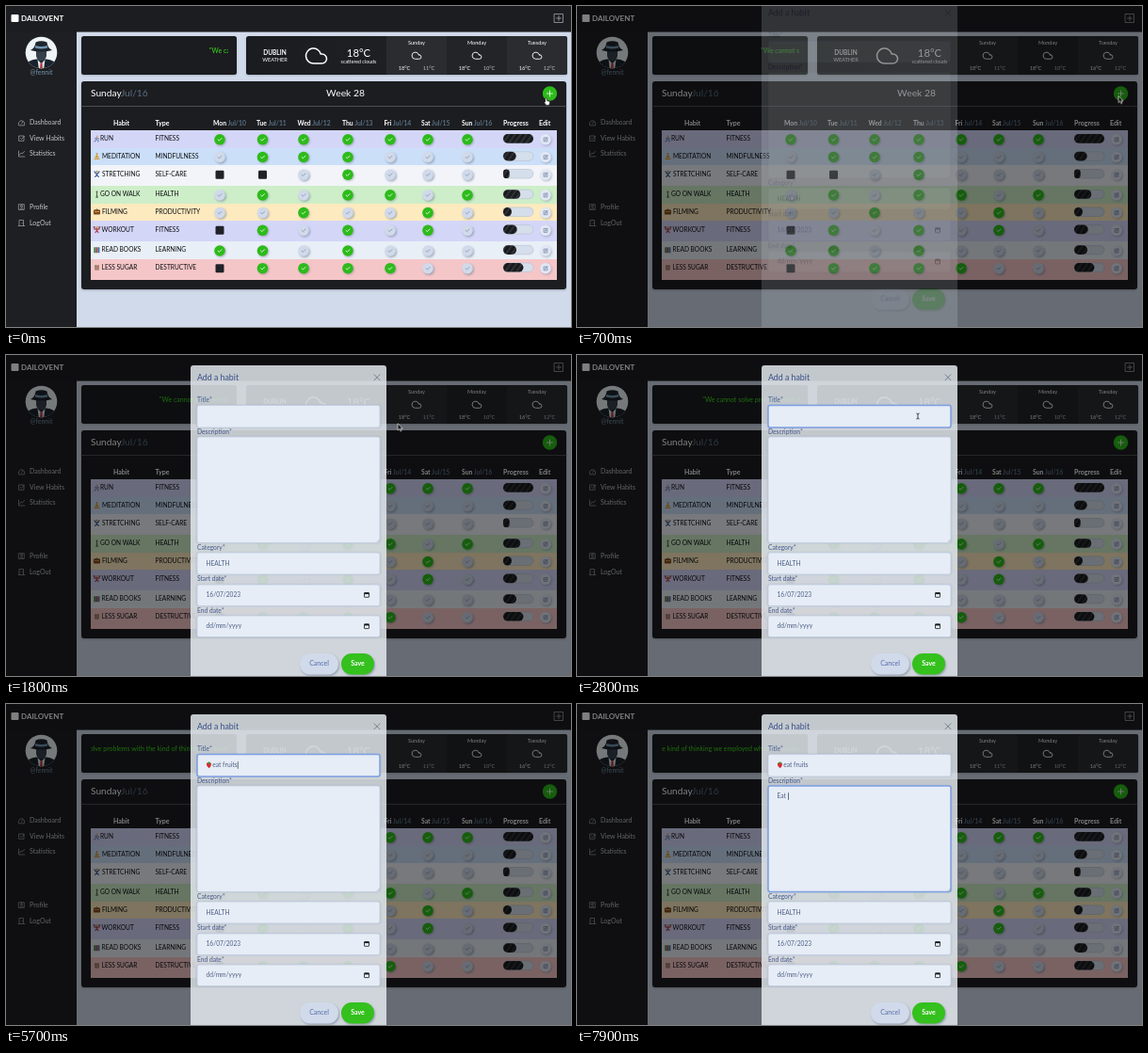
Animation of 600 by 341 pixels, one loop 8000 ms. Source, as an HTML page:

```html
<!DOCTYPE html>
<html lang="en">
<head>
<meta charset="utf-8">
<title>Habit tracker</title>
<style>
  html, body { margin: 0; width: 100%; height: 100%; overflow: hidden; background: #d0daea; }
  svg { display: block; width: 100vw; height: 100vh; }
  text { font: 7px Lato, "Open Sans", sans-serif; white-space: pre; }
  .bold { font-weight: 700; }
  .mid { text-anchor: middle; }
  .line { fill: none; stroke-linecap: round; stroke-linejoin: round; }
  .quote { animation: scroll 8s linear infinite; }
  .shade { animation: shade 8s linear infinite; }
  .modal { animation: fade 8s linear infinite, drop 8s linear infinite; }
  .mouse { animation: mouse 8s linear infinite; }
  .hand { animation: hand 8s step-end infinite; }
  .arrow { animation: arrow 8s step-end infinite; }
  .beam { animation: beam 8s step-end infinite; }
  @keyframes scroll { from { transform: translateX(216px); } to { transform: translateX(-20px); } }
  @keyframes shade { 0%, 6.5% { opacity: 0; } 8.375%, 100% { opacity: .5; } }
  @keyframes fade { 0%, 8.375% { opacity: 0; } 10.25%, 100% { opacity: 1; } }
  @keyframes drop {
    0% { transform: translateY(-20px); }
    8.375% { transform: translateY(-20px); animation-timing-function: ease-out; }
    12.125%, 100% { transform: none; }
  }
  @keyframes mouse {
    0% { transform: translate(573px, 98px); }
    6.5%, 16% { transform: translate(575px, 95.5px); animation-timing-function: ease-in-out; }
    26%, 100% { transform: translate(362px, 65px); }
  }
  @keyframes hand { 0% { opacity: 1; } 6.5%, 100% { opacity: 0; } }
  @keyframes arrow { 0% { opacity: 0; } 6.5% { opacity: 1; } 25%, 100% { opacity: 0; } }
  @keyframes beam { 0% { opacity: 0; } 25% { opacity: 1; } 41%, 100% { opacity: 0; } }
</style>
</head>
<body>
<svg id="stage" viewBox="0 0 600 341" preserveAspectRatio="none">
  <defs>
    <linearGradient id="sky"><stop stop-color="#1b1c1f"/><stop offset="1" stop-color="#222427"/></linearGradient>
    <pattern id="stripes" width="5" height="5" patternUnits="userSpaceOnUse" patternTransform="rotate(35)">
      <path d="M0 0H5V5H0Z" fill="#191a1d"/><path d="M0 0H2V5H0Z" fill="#2f3135"/>
    </pattern>
    <filter id="soft" x="-30%" y="-30%" width="160%" height="160%"><feGaussianBlur stdDeviation="1.2"/></filter>
    <clipPath id="ticker"><path d="M90 34H236V72H90Z"/></clipPath>
    <clipPath id="face"><circle cx="37.5" cy="49.5" r="16.8"/></clipPath>
    <path id="cloud" class="line" d="M6-2H4.74A8 8 0 1 0-3 8H6A5 5 0 0 0 6-2Z"/>
    <path id="tick" class="line" d="M-1.9 .1L-.6 1.3L2-1.3" stroke-width=".8"/>
    <g id="on">
      <circle cx=".9" cy="1" r="5.9" fill="#53616c" opacity=".4" filter="url(#soft)"/>
      <circle r="5.8" fill="#2dbb1a"/><use href="#tick" stroke="#fff"/>
    </g>
    <g id="off">
      <circle cx="1.2" cy="1.3" r="5.9" fill="#77859b" opacity=".6" filter="url(#soft)"/>
      <circle r="5.8" fill="#d0daea"/><use href="#tick" stroke="#8491aa"/>
    </g>
    <rect id="skip" x="-4.5" y="-4.5" width="9" height="9" rx="1.2" fill="#202228"/>
    <g id="edit">
      <circle cx="1" cy="1.1" r="5.8" fill="#77859b" opacity=".5" filter="url(#soft)"/>
      <circle r="5.8" fill="#e2e8f4"/>
      <path class="line" d="M.5-1.8H-2V2.1H1.9V-.3M-.5.6L-.2-.5L1.8-2.4L2.4-1.8L.4.3Z" stroke="#5d7196" stroke-width=".6"/>
    </g>
  </defs>
  <g id="page"></g>
  <rect class="shade" width="600" height="341"/>
  <g class="modal" id="modal"></g>
  <g class="mouse">
    <path class="hand" d="M-.3 0Q.6-.8 1.2.2L1.7 2.6L4 3.2Q4.8 3.5 4.5 4.6L3.8 7.4H.6L-1.6 4.5Q-1.6 3.6-.6 4.1Z" fill="#fff" stroke="#111" stroke-width=".7"/>
    <path class="arrow" d="M0 0V7.2L1.7 5.7L2.9 8.2L4 7.7L2.9 5.3H5.1Z" fill="#111" stroke="#fff" stroke-width=".6"/>
    <path class="beam line" d="M-1.2-3Q0-3 0-2V2Q0 3-1.2 3M1.2-3Q0-3 0-2M0 2Q0 3 1.2 3" stroke="#222" stroke-width=".8"/>
  </g>
</svg>
<script>
const byId = id => document.getElementById(id);
const text = (x, y, s, fill, size = 7, cls = "") =>
  `<text x="${x}" y="${y + size * .35}" fill="${fill}" class="${cls}" style="font-size:${size}px">${s}</text>`;
const box = (x, y, w, h, fill, r = 0, more = "") =>
  `<rect x="${x}" y="${y}" width="${w}" height="${h}" rx="${r}" fill="${fill}" ${more}/>`;
const glow = (x, y, w, h, fill, r, opacity) => box(x, y, w, h, fill, r, `opacity="${opacity}" filter="url(#soft)"`);
const line = (d, color, width = .8) => `<path class="line" d="${d}" stroke="${color}" stroke-width="${width}"/>`;
const dot = (x, y, r, fill) => `<circle cx="${x}" cy="${y}" r="${r}" fill="${fill}"/>`;
const use = (id, x, y, more = "") => `<use href="#${id}" transform="translate(${x} ${y})" ${more}/>`;
const at = (x, y, s) => `<g transform="translate(${x} ${y})">${s}</g>`;

const DARK = "#1c1d20", SLATE = "#587084", NAVY = "#455a90", WHITE = "#fff";

function sidebar() {
  const items = [
    ["Dashboard", 124, "M-3 2.5A3.3 3.3 0 1 1 3 2.5ZM0 1L1.5-1"],
    ["View Habits", 140.5, "M-2.5-2.5H2.5V2.8H-2.5ZM-1 0L0 1L3-2.2"],
    ["Statistics", 157, "M-3-3V3H3.3M-2 1L-.4-1L.8 0L3-2.5"],
    ["Profile", 213.5, "M-2.8-2.8H2.8V2.8H-2.8ZM-1.6 2.6Q0-.2 1.6 2.6M-.8-.8A.9.9 0 1 1 .8-.8A.9.9 0 1 1-.8-.8"],
    ["LogOut", 230.5, "M-2.5 3V-3H2V3M-3.3 3H3.3M.7 0V.3"]
  ];
  const avatar = dot(37.5, 49.5, 16.8, "#eef3f5") + `<g clip-path="url(#face)">
    <path d="M18 69Q20 58 32 56.5H43Q55 58 57 69Z" fill="#18222d"/>
    <path d="M32 46H43V53Q42 58 37.5 58.5Q33 58 32 53Z" fill="#35404a"/>
    <path d="M26 47Q31 44.5 31.5 38.5Q37.5 36 43.5 38.5Q44 44.5 49 47Q37.5 50 26 47Z" fill="#1d252d"/>
    <path d="M31.2 42Q37.5 44 43.8 42L44.3 44.5Q37.5 46.5 30.7 44.5Z" fill="#7196b0"/>
    <path d="M33.5 57L37.5 61L41.5 57L40 68H35Z" fill="#dbe4e8"/>
    <path d="M36.6 60H38.4L39 68H36Z" fill="#b83336"/></g>`;
  return box(0, 0, 75, 341, "#1e1f22") + box(0, 0, 600, 27.6, DARK) +
    box(5.5, 9, 8, 8, WHITE, 1) + text(16, 13.3, "DAILOVENT", WHITE, 8, "bold") +
    line("M582.5 8.5H591.5V17.5H582.5ZM587 10.5V15.5M584.5 13H589.5", "#b4b7bb", .7) +
    avatar + text(37.5, 71, "@fennit", "#7395ab", 7, "mid") +
    items.map(([name, y, d]) => at(16.5, y, line(d, "#a4a8ad", .7)) + text(25, y, name, "#c2c6ca")).join("");
}

function topCards() {
  const days = [["Sunday", 436, 18, 11], ["Monday", 500, 18, 10], ["Tuesday", 564, 16, 12]];
  const cloud = (x, y, scale, width) =>
    `<g transform="translate(${x} ${y}) scale(${scale})"><use href="#cloud" stroke="#fff" stroke-width="${width}"/></g>`;
  const card = (x, w, fill) => glow(x, 33, w, 41, "#56616e", 3, .3) + box(x, 32, w, 41, fill, 2.5);
  return card(80, 165, "#1b1c1f") + card(255, 341, "url(#sky)") +
    `<g clip-path="url(#ticker)"><g class="quote">${text(0, 47.5,
      "\"We cannot solve problems with the kind of thinking we employed when we came up with them.\"", "#3bdc1e")}</g></g>` +
    text(285.5, 50, "DUBLIN", WHITE, 6.5, "mid bold") + text(285.5, 57, "WEATHER", WHITE, 5.6, "mid") +
    cloud(329.5, 53, 1, 1.5) +
    text(374.5, 50, "18°C", WHITE, 11.3, "mid") + text(374.5, 58.7, "scattered clouds", WHITE, 5.3, "mid") +
    days.map(([day, x, hi, lo], i) =>
      box(x - 32, 32, 64, 41, i % 2 ? "#222427" : "#2a2c30", i == 2 ? 2.5 : 0) +
      text(x, 39, day, WHITE, 5.6, "mid") + cloud(x, 52.7, .45, 2) +
      text(x - 13, 66, hi + "°C", WHITE, 5.6, "mid") + text(x + 13, 66, lo + "°C", "#bcbfc3", 5.6, "mid")).join("");
}

// Little row pictures, drawn in a 7 by 7 box
const figure = (skin, shirt, d) => line(d, shirt, 1.2) + dot(3.5, 1, 1, skin);
const pictures = [
  figure("#d9a066", "#7d8eb8", "M3.6 2.4L3 4.4L5 5.3L4.8 6.8M3 4.4L1 6.6M1.4 3.4L3.5 2.6L5.5 3.6"),
  figure("#c98d43", "#d39a2c", "M3.5 2.4V4.6M1 6.2H6M2 4.6L3.5 2.8L5 4.6"),
  figure("#b98a3c", "#3c5f96", "M1 1L2.4 3L3.5 4L4.6 3L6 1M3.5 3V5L1.5 6.6M3.5 5L5.5 6.6"),
  figure("#6b573d", "#5a6a50", "M3.5 2.2V4.6L3 6.8M3.5 4.6L4.2 6.8"),
  box(0, 1.3, 7, 5, "#7d4b22", .7) + box(1, 2.8, 5, 1, "#d49441") + line("M2.3 1.2Q3.5 0 4.7 1.2", "#54331b"),
  figure("#c8934c", "#a8434b", "M3.5 2.4V4.6L2 6.7M3.5 4.6L5 6.7M1 1V3.2L6 3.2V1") + line("M0 1H1M6 1H7", "#333"),
  box(.3, .7, 2, 6, "#4b8750", .3) + box(2.4, .7, 1.8, 6, "#a24640", .3) + box(4.4, .7, 2, 6, "#456ea0", .3),
  box(1, 2, 5, 4.5, "#a98674", 1) + dot(2.3, 1.8, 1.2, "#6d8e6b") + dot(4.7, 1.8, 1.2, "#b56c62")
];

// name, type, text x, colour, week (g done, w open, t skipped), progress
const habits = [
  ["RUN", "FITNESS", 100, "#d4d6f8", "ggggggg", 1],
  ["MEDITATION", "MINDFULNESS", 102, "#cbdff9", "wgggwww", .43],
  ["STRETCHING", "SELF-CARE", 102, "#f2f4f9", "ttwgwww", .21],
  ["GO ON WALK", "HEALTH", 100, "#cdeec8", "wgwggwg", .57],
  ["FILMING", "PRODUCTIVITY", 102, "#fdeabf", "wwgwwgw", .28],
  ["WORKOUT", "FITNESS", 101.5, "#d4d6f8", "tgwgwgw", .46],
  ["READ BOOKS", "LEARNING", 101.5, "#e9eff6", "ggwgwww", .44],
  ["LESS SUGAR", "DESTRUCTIVE", 101.5, "#f5c6c8", "tggggww", .67]
];
const kinds = { g: "on", w: "off", t: "skip" };
const week = [["Mon", 220, 227], ["Tue", 266, 272.5], ["Wed", 309.5, 316], ["Thu", 357, 363],
  ["Fri", 401.5, 408], ["Sat", 441, 448], ["Sun", 484, 490]];

function progress(y, part) {
  return box(528, y - 4.8, 32, 9.6, "#d5deeb", 4.8, 'stroke="#b4bfcf" stroke-width=".6"') +
    box(528, y - 4.8, 32 * part, 9.6, "url(#stripes)", Math.min(4.8, 16 * part));
}

// Rows with a skipped day are taller
function tableRows() {
  let top = 132;
  return habits.map(([name, type, x, color, marks, part], i) => {
    const y = top + 8.9, mid = top + 9.8, start = Math.round(top);
    top += marks.includes("t") ? 21.7 : 18.7;
    return box(90, start, 495, Math.round(top) - start, color) + at(93, y - 3.5, pictures[i]) +
      text(x, y, name, "#0c0d10", 6.6) + text(158.5, y, type, "#0c0d10", 6.6) +
      week.map((day, n) => use(kinds[marks[n]], day[2], mid)).join("") +
      progress(y, part) + use("edit", 573, mid);
  }).join("");
}

function panel() {
  const heads = week.map(([day, x], i) =>
    `<text x="${x}" y="126.8" fill="#fff" class="bold" style="font-size:6.8px">${day} <tspan fill="${SLATE}">Jul/${10 + i}</tspan></text>`);
  return glow(80, 81, 515, 221, "#4f5965", 3, .4) + box(80, 80, 515, 221, DARK, 3) +
    `<text x="90" y="96.2" fill="#fff" style="font-size:10.2px">Sunday<tspan fill="${SLATE}">Jul/16</tspan></text>` +
    text(360.5, 92.6, "Week 28", WHITE, 10.3, "mid") + line("M80 106.5H595", "#606368", .7) +
    dot(577.5, 93, 7.7, "#2dbb1a") + line("M574.5 93H580.5M577.5 90V96", WHITE, .8) +
    text(122.5, 124.3, "Habit", WHITE, 7, "mid bold") + text(158.5, 124.3, "Type", WHITE, 7, "bold") +
    text(528, 124.3, "Progress", WHITE, 7, "bold") + text(566, 124.3, "Edit", WHITE, 7, "bold") +
    heads.join("") + tableRows();
}

function field(label, ly, y, h, id = "") {
  return text(203, ly, label, NAVY, 6.7) + glow(202.5, y, 195, h, "#8c9db9", 2.5, .6) +
    box(203, y, 194, h, "#e6edf6", 2.2, `id="${id}" stroke="#c3cfe2" stroke-width=".9"`);
}

function dialog() {
  const calendar = y => at(383, y, box(-2.5, -2, 5, 4.6, "none", .4, 'stroke="#16181c" stroke-width=".8"') +
    box(-2.5, -2.4, 5, 1.8, "#16181c"));
  const value = (y, s) => text(212.5, y, s, "#4e6088", 6.6);
  const button = (x, w, fill) => glow(x + 1, 318.5, w, 22.5, "#6f7d94", 11.2, .6) + box(x, 317, w, 22.5, fill, 11.2);
  return box(196, 11, 208, 360, "#e1e7ec", 3, 'fill-opacity=".86"') +
    text(203, 23.5, "Add a habit", "#38508a", 8.8) + line("M391 20.8L397 26.8M397 20.8L391 26.8", "#697384", .8) +
    field("Title*", 48, 53.5, 23.5, "titleBox") + field("Description*", 81.5, 87, 112.5, "noteBox") +
    line("M394 198.5L396.5 196M395.6 198.5L396.5 197.6", "#78818e", .4) +
    field("Category*", 204.5, 210, 23) + value(221.3, "HEALTH") +
    field("Start date*", 238, 244, 22.5) + value(254.7, "16/07/2023") + calendar(254.7) +
    field("End date*", 271.3, 277, 22.5) + value(288, "dd/mm/yyyy") + calendar(288) +
    button(312, 41, "#d0daea") + text(332.5, 328, "Cancel", "#566ca8", 7, "mid") +
    button(356, 35, "#34c01d") + text(373.5, 328, "Save", WHITE, 7, "mid bold") +
    `<g id="berry"><path d="M212.8 63.5Q215.3 60.8 218 63.3Q218.3 66 215.7 68.3Q212.8 66.5 212.8 63.5Z" fill="#d92b32"/>
      <path d="M213.3 62.9L215.4 61.2L217.6 62.7L215.5 63.7Z" fill="#43903b"/></g>` +
    `<g id="titleText">${text(219.2, 65, "", "#4e6088", 6.7)}</g>` +
    `<g id="noteText">${text(212.5, 98, "", "#4e6088", 6.7)}</g>` +
    box(0, 0, .7, 7.6, "#2c3442", 0, 'id="caret"');
}

byId("page").innerHTML = box(0, 0, 600, 341, "#d0daea") + sidebar() + topCards() + panel();
byId("modal").innerHTML = dialog();

const title = { words: "eat fruits", keys: [3700, 3850, 3980, 4300, 4600, 4750, 4900, 5050, 5200, 5400],
  focus: 2200, blur: 6500, box: byId("titleBox"), text: byId("titleText").firstChild, y: 61.2 };
const note = { words: "Eat ", keys: [7300, 7480, 7620, 7800],
  focus: 6500, blur: 8000, box: byId("noteBox"), text: byId("noteText").firstChild, y: 94.2 };
const BERRY = 3350;
const caret = byId("caret"), berry = byId("berry");

function type(input, t) {
  const done = input.keys.filter(k => k <= t);
  const active = t >= input.focus && t < input.blur;
  input.text.textContent = input.words.slice(0, done.length);
  input.box.setAttribute("stroke", active ? "#7d9fe2" : "#c3cfe2");
  input.box.setAttribute("stroke-width", active ? 1.5 : .9);
  if (!active) return;
  const pasted = input == title && t >= BERRY ? BERRY : 0;
  const last = Math.max(input.focus, pasted, ...done);
  const start = input == title && !pasted ? 212.5 : +input.text.getAttribute("x");
  caret.setAttribute("x", start + (done.length ? input.text.getComputedTextLength() : 0) + .3);
  caret.setAttribute("y", input.y);
  caret.style.opacity = (t - last) % 1000 < 500 ? 1 : 0;
}

const begin = performance.now();
function tick() {
  const t = (performance.now() - begin) % 8000;
  berry.style.opacity = t >= BERRY ? 1 : 0;
  caret.style.opacity = 0;
  type(title, t);
  type(note, t);
  requestAnimationFrame(tick);
}
tick();
</script>
</body>
</html>
```
